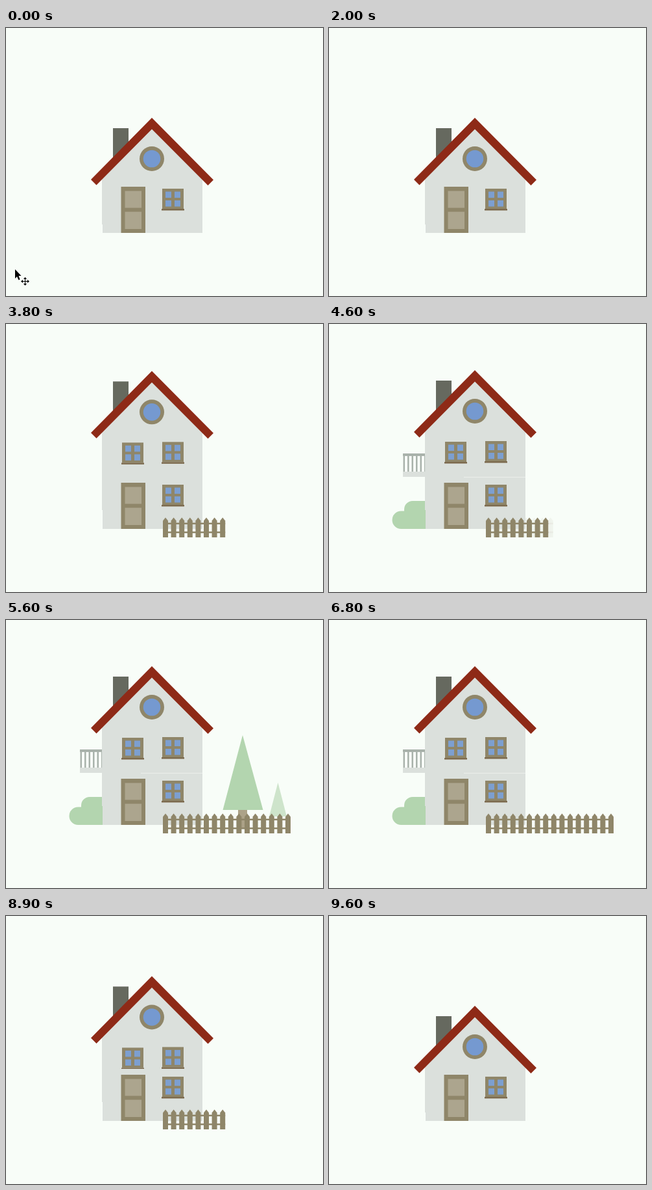
These frames come from a looping animation (489 by 412 pixels, 9900 ms). An HTML page with a canvas:

```html
<!DOCTYPE html>
<html lang="en">
<head>
<meta charset="utf-8">
<title>Growing house</title>
<style>
  html, body { margin: 0; width: 100%; height: 100%; overflow: hidden; background: #f8fdf8; }
  canvas { display: block; }
</style>
</head>
<body>
<canvas id="stage" width="489" height="412"></canvas>
<script>
const ctx = document.getElementById('stage').getContext('2d');
const LOOP = 9900, STEP = 100, RISE = 67;
const C = {
  sky: '#f8fdf8', wall: '#dbe0dc', seam: '#ebefeb', roof: '#8e2a17', chimney: '#66695f',
  wood: '#8f8669', panel: '#aca58e', sill: '#7c6a4e', glass: '#7599d0', pane: '#7d9fd0',
  rail: '#a9b2ab', leaf: '#b3d5af', trunk: '#aca288'
};

const clamp = v => Math.max(0, Math.min(1, v));
const ease = p => p < 0.5 ? 2 * p * p : 1 - 2 * (1 - p) * (1 - p);
const span = (t, from, to) => clamp((t - from) / (to - from));

function rect(x, y, w, h, color) {
  ctx.fillStyle = color;
  ctx.fillRect(x, y, w, h);
}

function poly(points, color) {
  ctx.beginPath();
  points.forEach(([x, y]) => ctx.lineTo(x, y));
  ctx.closePath();
  ctx.fillStyle = color;
  ctx.fill();
}

function disc(x, y, r, color) {
  ctx.beginPath();
  ctx.arc(x, y, r, 0, Math.PI * 2);
  ctx.fillStyle = color;
  ctx.fill();
}

function part(alpha, dx, dy, draw) {
  if (alpha <= 0) return;
  ctx.save();
  ctx.globalAlpha = alpha;
  ctx.translate(dx, dy);
  draw();
  ctx.restore();
}

function squareWindow(x, y) {
  rect(x, y, 33, 31, C.wood);
  for (const px of [5, 19])
    for (const py of [4.5, 18]) rect(x + px, y + py, 9, 9.5, C.pane);
  rect(x - 1, y + 31, 35, 2.5, C.sill);
}

function upperFloor() {
  rect(165, 154, 24, 50, C.chimney);
  poly([[225, 150], [303, 230], [303, 302], [148, 302], [148, 230]], C.wall);
  poly([[225, 138], [320, 233.5], [311.5, 242], [225, 155.5], [139.5, 241.5], [131, 233]], C.roof);
  disc(225, 201, 19, C.wood);
  disc(225, 201, 13.3, C.glass);
  squareWindow(179, 248);
  squareWindow(241, 247);
}

function groundFloor() {
  rect(148, 235, 155, 51, C.wall);
  rect(149, 286, 154, 29, C.wall);
  rect(177.5, 244, 37.5, 71, C.wood);
  rect(183.5, 250.5, 25.5, 26, C.panel);
  rect(183.5, 282.5, 25.5, 26.5, C.panel);
  squareWindow(241, 247);
}

function fence(first, railStart) {
  const gap = 12.6, end = 242 + (first + 7) * gap + 8;
  rect(railStart, 305.5, end - railStart, 2.5, C.wood);
  rect(railStart, 319, end - railStart, 2.5, C.wood);
  for (let i = first; i < first + 8; i++) {
    const x = 242 + i * gap;
    poly([[x, 328], [x, 302.5], [x + 4, 297.5], [x + 8, 302.5], [x + 8, 328]], C.wood);
  }
}

function balcony() {
  for (let i = 0; i < 6; i++) rect(114.5 + i * 6.5, 203, 2.5, 24, C.rail);
  rect(114, 199, 35, 4, C.rail);
  rect(114, 227, 35, 8, C.wall);
}

function bush() {
  ctx.fillStyle = C.leaf;
  ctx.beginPath();
  ctx.roundRect(97.5, 287.5, 51.5, 27.5, [13.7, 0, 0, 13.7]);
  ctx.roundRect(116, 272, 33, 40, [13, 0, 0, 0]);
  ctx.fill();
}

function bigTree() {
  rect(358, 290, 14, 29, C.trunk);
  poly([[365, 177], [396.5, 292], [334.5, 292]], C.leaf);
}

function smallTree() {
  poly([[419.5, 250], [433, 302], [406, 302]], C.leaf);
}

function pointer(x, y) {
  ctx.save();
  ctx.translate(x, y);
  const arrow = [[0, 0], [0, 14], [3, 11], [5.5, 16.5], [7.5, 15.5], [5.5, 10], [9.5, 10]];
  poly(arrow, '#000');
  ctx.translate(15.5, 18.5);
  rect(-5, -0.5, 10, 1, '#000');
  rect(-0.5, -5, 1, 10, '#000');
  for (let i = 0; i < 4; i++) {
    poly([[6.5, 0], [3.5, -2.5], [3.5, 2.5]], '#000');
    ctx.rotate(Math.PI / 2);
  }
  ctx.restore();
}

function drawPointer(t) {
  if (t < 100) pointer(14, 371);
  else if (t < 200) pointer(0, 366);
  else if (t < 300) pointer(12, 358);
  else if (t < 500) pointer(38, 350);
  else if (t < 600) pointer(33, 335);
}

// Fades in while sliding to its place, then drifts on while fading out.
function passing(t, start, shown, leave, gone, slide, drift, draw) {
  const enter = ease(span(t, start, shown)), exit = span(t, leave, gone);
  const d = exit ? exit * drift[2] : (enter - 1) * slide;
  part(enter * (1 - exit), d * drift[0], d * drift[1], draw);
}

function scene(t) {
  rect(0, 0, 489, 412, C.sky);

  const left = [-1, 0, 11], up = [0, -1, 10];
  passing(t, 3900, 4500, 7900, 8200, 30, left, () => { balcony(); bush(); });
  passing(t, 5050, 5550, 6500, 6800, 14, up, bigTree);
  passing(t, 5350, 5800, 6500, 6800, 0, up, smallTree);

  const wide = ease(span(t, 4490, 5060)) * (1 - ease(span(t, 7100, 7500)));
  part(wide, (wide - 1) * 100.8, 0, () => fence(8, 338));

  const tall = ease(span(t, 2900, 3900)) * (1 - ease(span(t, 8500, 9500)));
  part(1, 0, -RISE * tall, upperFloor);
  groundFloor();
  if (tall === 1) rect(208, 235, 95, 1, C.seam);

  const grown = span(t, 3200, 3700) * (1 - span(t, 9100, 9600));
  if (grown > 0) {
    ctx.save();
    ctx.globalAlpha = Math.min(1, grown * 1.5);
    ctx.translate(0, 328);
    ctx.scale(1, grown);
    ctx.translate(0, -328);
    fence(0, 242);
    ctx.restore();
  }
  drawPointer(t);
}

let begin = null;
function tick(now) {
  if (begin === null) begin = now;
  const t = (now - begin) % LOOP;
  scene(Math.floor(t / STEP) * STEP);
  requestAnimationFrame(tick);
}
scene(0);
requestAnimationFrame(tick);
</script>
</body>
</html>
```
